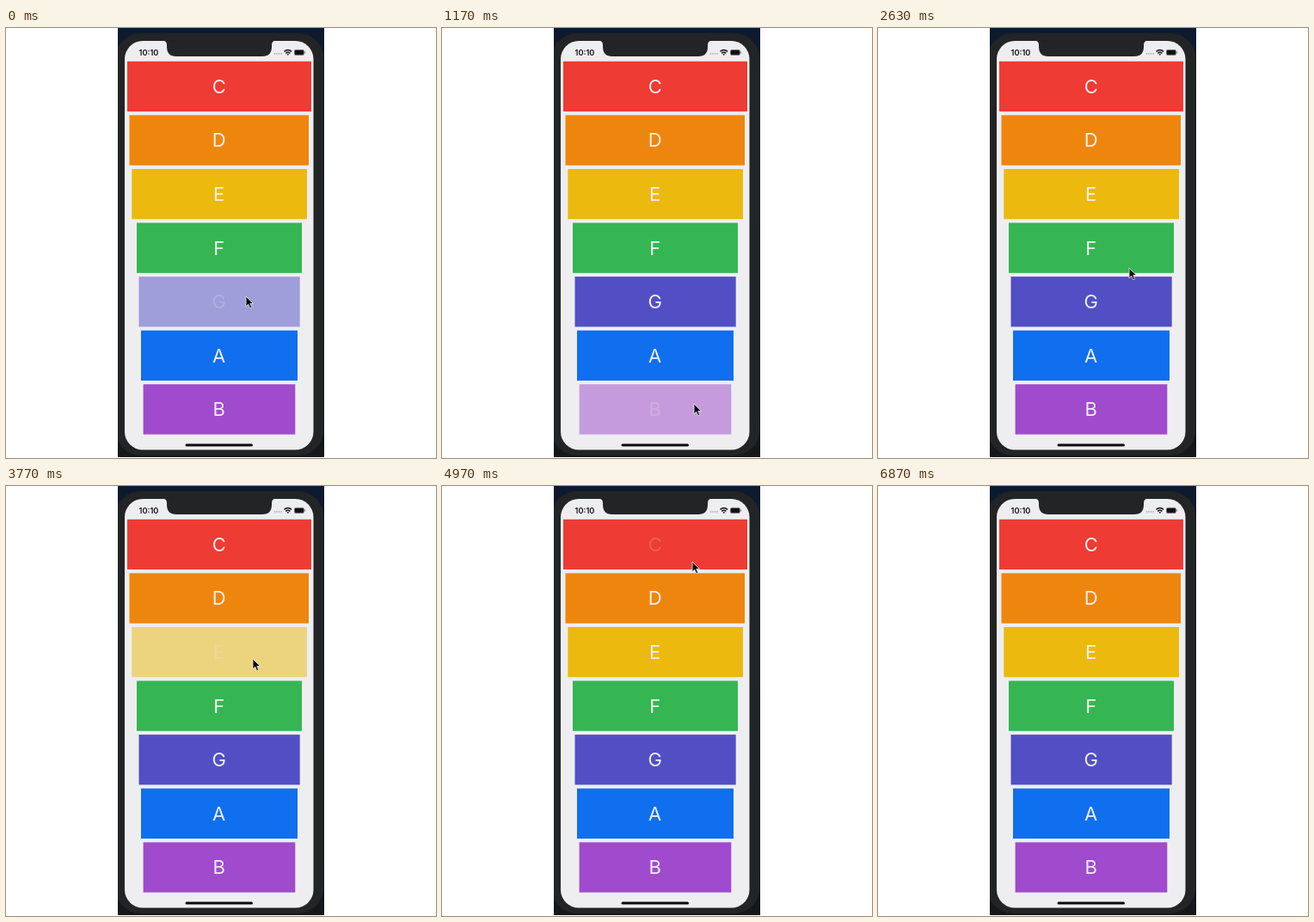
These frames come from a looping animation (500 by 500 pixels, 6930 ms). An HTML page:

```html
<!DOCTYPE html>
<html lang="en">
<head>
<meta charset="utf-8">
<title>Xylophone</title>
<style>
html, body { margin: 0; width: 100%; height: 100%; overflow: hidden; background: #fff; }
svg { display: block; width: 500px; height: 500px; }
text { font-family: Inter, Roboto, sans-serif; }
.note { font-size: 22px; fill: #eeeef2; text-anchor: middle; }
.clock { font-size: 9.2px; font-weight: 600; fill: #111; }
</style>
</head>
<body>
<svg viewBox="0 0 500 500">
  <defs>
    <linearGradient id="desk" x1="0" y1="0" x2="0" y2="1">
      <stop offset="0" stop-color="#0d1a2e"/>
      <stop offset=".25" stop-color="#141d2b"/>
      <stop offset="1" stop-color="#15171b"/>
    </linearGradient>
    <clipPath id="video"><rect x="130" width="240" height="499"/></clipPath>
  </defs>
  <g clip-path="url(#video)">
    <rect x="130" width="240" height="499" fill="url(#desk)"/>
    <rect x="127" y="6" width="242.5" height="491" rx="30" fill="#222425"/>
    <rect x="138" y="15" width="219.5" height="475.5" rx="21" fill="#eeeef0"/>
    <path d="M182 14.5q5 .5 5 5v2q0 11.500 11 11.500h100q11 0 11-11.500v-2q0-4.500 5-5z" fill="#222425"/>

    <text class="clock" x="154.500" y="31.700">10:10</text>
    <g fill="#999">
      <circle cx="312.500" cy="30" r=".8"/><circle cx="315" cy="30" r=".8"/>
      <circle cx="317.500" cy="30" r=".8"/><circle cx="320" cy="30" r=".8"/>
    </g>
    <g fill="none" stroke="#111" stroke-width="1.500">
      <path d="M323.500 27.300q4.300-3.600 8.600 0M325.200 29.300q2.600-2.100 5.200 0"/>
    </g>
    <path d="M326.500 30.600q1.300-1 2.600 0l-1.300 1.500z" fill="#111"/>
    <rect x="335.400" y="25.400" width="11" height="6" rx="1.500" fill="#111" stroke="#777" stroke-width=".7"/>
    <rect x="347.200" y="27.300" width="1" height="2.200" rx=".5" fill="#777"/>

    <g id="keys"></g>
    <rect x="208.500" y="483.500" width="78.500" height="3" rx="1.500" fill="#0c0c0c"/>
    <path id="cursor" d="M0 0V11.800L2.700 9.300L4.700 13.700L6.700 12.800L4.800 8.500H8.500Z"
      fill="#0a0a0a" stroke="#eee" stroke-width=".8" stroke-linejoin="round"/>
  </g>
</svg>
<script>
const LOOP = 6930, HOLD = 110, DIM = 200, FADE = 260;

// note, left, right, colour, touch-down times
const keys = [
  ["C", 141, 355, "#ee3b33", [4930]],
  ["D", 143.5, 352, "#ee860d", [4300]],
  ["E", 146.3, 350, "#ecb90f", [3640]],
  ["F", 152, 344, "#36b652", [3040]],
  ["G", 154.5, 341.7, "#524fc5", [-130, 2270]],
  ["A", 157, 339, "#0f6fee", [490, 1750]],
  ["B", 159.6, 336.3, "#a04bcd", [1040]]
];

// time, x, y
const path = [
  [0, 279, 312], [130, 279, 312], [450, 286, 375], [640, 286, 375],
  [1020, 293, 437], [1260, 293, 437], [1680, 294, 377], [1900, 294, 377],
  [2220, 293, 319], [2400, 293, 319], [2630, 292, 279], [3200, 292, 275],
  [3580, 287, 201], [3820, 287, 201], [4230, 289, 142], [4460, 289, 142],
  [4860, 291, 88], [5300, 291, 88], [5730, 309, 86], [6230, 374, 80]
];

function make(tag, attrs, parent) {
  const el = document.createElementNS("http://www.w3.org/2000/svg", tag);
  for (const name in attrs) el.setAttribute(name, attrs[name]);
  return parent.appendChild(el);
}

const bars = keys.map(([note, left, right, fill, downs], i) => {
  const y = 38.8 + i * 62.58;
  const group = make("g", {}, document.getElementById("keys"));
  make("rect", { x: left, y, width: right - left, height: 58.3, fill }, group);
  const label = make("text", { class: "note", x: 247.7, y: y + 37 }, group);
  label.textContent = note;
  return { group, label, downs };
});

const cursor = document.getElementById("cursor");
const clamp = v => Math.min(1, Math.max(0, v));
const smooth = v => v * v * (3 - 2 * v);

function drawBar({ group, label, downs }, t) {
  const age = t - downs.filter(d => d <= t).pop();
  const dimmed = age >= HOLD && age < HOLD + DIM;
  group.setAttribute("opacity", dimmed ? 0.5 : 1);
  const shown = age >= 0 ? 0.2 + 0.8 * smooth(clamp((age - HOLD) / FADE)) : 1;
  label.setAttribute("opacity", shown);
}

function drawCursor(t) {
  const next = path.findIndex(p => p[0] > t);
  cursor.setAttribute("visibility", next < 0 ? "hidden" : "visible");
  if (next < 0) return;
  const [t0, x0, y0] = path[next - 1], [t1, x1, y1] = path[next];
  const k = smooth((t - t0) / (t1 - t0));
  cursor.setAttribute("transform", `translate(${x0 + (x1 - x0) * k} ${y0 + (y1 - y0) * k})`);
}

const start = performance.now();
function draw(now) {
  const t = Math.max(0, now - start) % LOOP;
  bars.forEach(bar => drawBar(bar, t));
  drawCursor(t);
  requestAnimationFrame(draw);
}
draw(start);
</script>
</body>
</html>
```
